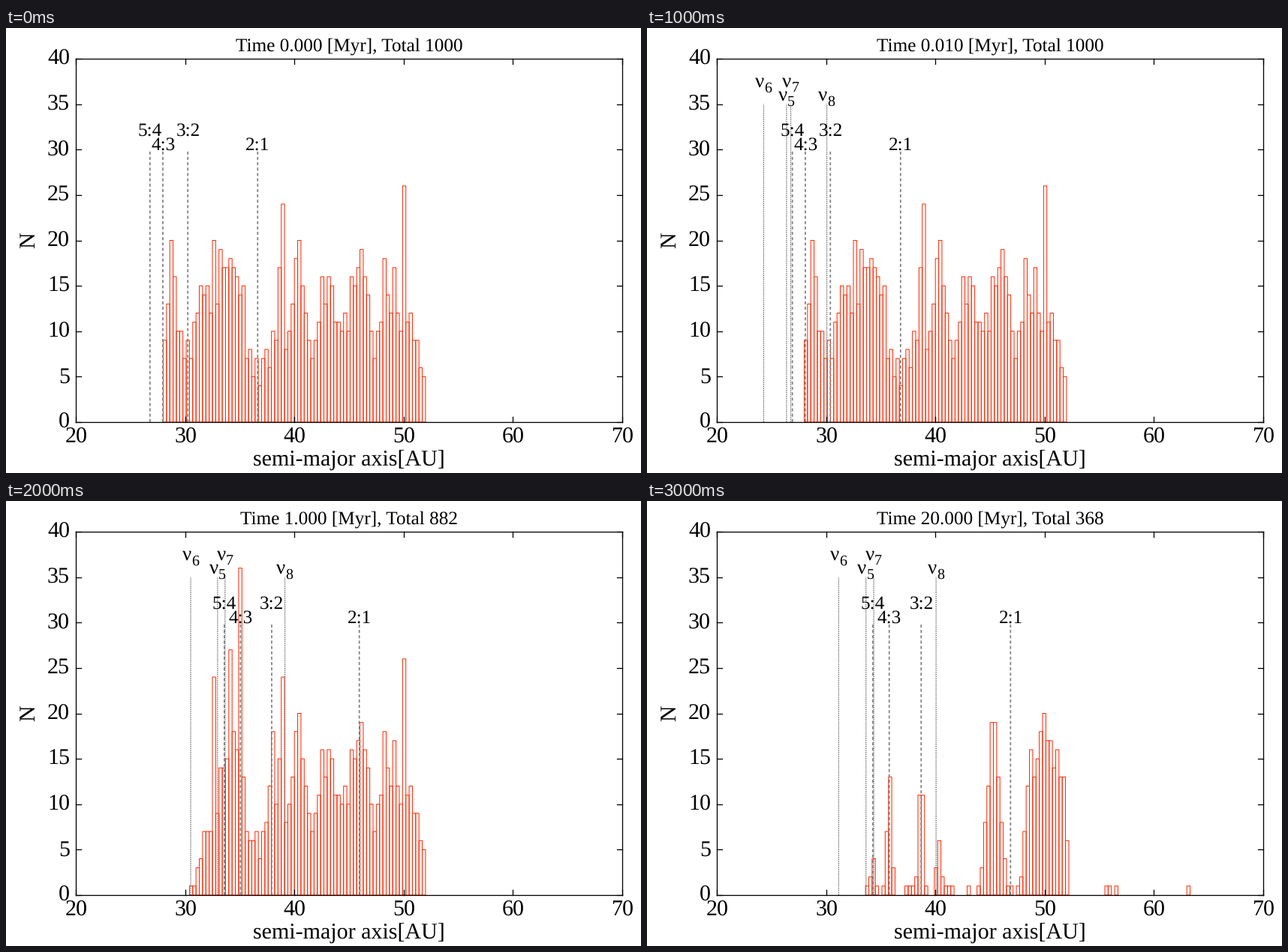
A matplotlib script for the animation above (3500 ms loop, 846 by 594 pixels).

```python
import matplotlib.pyplot as plt
import numpy as np
from matplotlib.animation import FuncAnimation
from matplotlib.collections import LineCollection, PolyCollection

W, H, DPI = 846, 594, 72          # at 72 dpi one point is one pixel
LEFT, RIGHT, TOP, BOTTOM = 93, 821, 41, 526
BIN, BINS, DISC = 0.3, 130, 80    # bin width in AU, all bins, bins in the disc
INNER = 36                        # bins swept during the first Myr

# p, q and label height of the mean-motion resonances
RATIOS = [(5, 4, 32), (4, 3, 30.5), (3, 2, 32), (2, 1, 30.5)]
# index, label height, starting place and drift of the secular resonances
SECULAR = [(6, 37, 24.16, 1.083), (5, 35.5, 26.25, 1.146),
           (7, 37, 26.63, 1.198), (8, 35.5, 29.89, 1.577)]

plt.rcParams["font.family"] = "Liberation Serif"
plt.rcParams["text.hinting"] = "none"
rng = np.random.default_rng(4)


def resonances(planet):
    return [planet * (p / q) ** (2 / 3) for p, q, _ in RATIOS]


def secular(planet):
    return [a + drift * (planet - 23.08) for _, _, a, drift in SECULAR]


def centres(origin):
    return origin + BIN * (np.arange(BINS) + 0.5)


def bump(au, centre, height, width, power=2):
    return height * np.exp(-np.abs((au - centre) / width) ** power)


def settle(shape, total):
    """Whole-numbered, slightly noisy counts that add up to total."""
    shape = shape + rng.normal(0, 0.45, len(shape)) * np.sqrt(shape)
    shape = np.maximum(shape, 0)
    shape /= shape.sum()
    counts = np.rint(shape * total).astype(int)
    while counts.sum() != total:
        i = rng.choice(len(counts), p=shape)
        counts[i] = max(0, counts[i] + np.sign(total - counts.sum()))
    return counts


def disc(total):
    peaks = [(0, 10), (2, 17), (6, 8), (14, 15), (20, 20), (27, 6), (34, 9),
             (36, 22), (37, 9), (41, 19), (45, 8), (50, 16), (54, 10),
             (60, 18), (64, 7), (67, 16), (72, 12), (73, 22), (74, 12),
             (79, 7)]
    counts = np.zeros(BINS, int)
    counts[:DISC] = settle(np.interp(np.arange(DISC), *zip(*peaks)), total)
    return counts


def swept(counts, planet, total):
    """Clear the inner disc and pile bodies up in the resonances."""
    au = centres(28)
    _, four_three, three_two, _ = resonances(planet)
    shape = counts * np.clip((au - 30) / 4.2, 0, 1)
    shape += bump(au, 32.65, 10, 0.12) + bump(au, 34.15, 9, 0.12)
    shape += bump(au, four_three, 22, 0.12) + bump(au, three_two, 9, 0.3)
    result = counts.copy()
    result[:INNER] = settle(shape[:INNER], total - counts[INNER:].sum())
    return result


def belt(origin, planet, total, heights, spread, haze, strays):
    """Resonant groups, two broad belts and a few far bodies."""
    au = centres(origin)
    shape = haze * ((au > 37) & (au < 48))
    for centre, height in zip(resonances(planet), heights):
        shape = shape + bump(au, centre, height, 0.3)
    shape += bump(au, secular(planet)[3] + 0.2, 5, 0.3)
    shape += bump(au, 45.35, 18, spread)
    shape += bump(au, 50.05, 15, 2, 8) + bump(au, 50.05, 8, 0.15)
    counts = settle(shape, total - len(strays))
    for a in strays:
        counts[int((a - origin) / BIN)] += 1
    return counts


start = disc(1000)
stirred = start.copy()
stirred[[0, 5]] += 1
stirred[[1, 7]] -= 1

# time, bin origin, planet axis, counts
STEPS = [
    (0, 28, 23.07, start),
    (0.001, 28, 23.08, start),
    (0.01, 28, 23.18, start),
    (0.1, 28, 24.15, stirred),
    (1, 28, 28.93, swept(start, 28.93, 882)),
    (10, 28, 29.80,
     belt(28, 29.80, 454, (7, 16, 18), 1, 2.5, [65])),
    (20, 27.908, 29.52,
     belt(27.908, 29.52, 368, (5, 13, 12), 0.75, 0.4,
          [55.6, 55.9, 56.5, 63.1])),
]


def px(au):
    return LEFT + (au - 20) * (RIGHT - LEFT) / 50


def py(n):
    return BOTTOM - n * (BOTTOM - TOP) / 40


def stem(au, top):
    return [(px(au) + 0.25, BOTTOM), (px(au) + 0.25, py(top))]


def box(origin, b, n):
    x0, x1 = px(origin + b * BIN), px(origin + (b + 1) * BIN)
    return [(x0, BOTTOM), (x0, py(n)), (x1, py(n)), (x1, BOTTOM)]


fig = plt.figure(figsize=(W / DPI, H / DPI), dpi=DPI, facecolor="white")
ax = fig.add_axes([0, 0, 1, 1])
ax.set_xlim(0, W)
ax.set_ylim(H, 0)
ax.axis("off")


def label(x, y, text="", size=25.2, **kw):
    kw = {"ha": "center", "va": "baseline", **kw}
    return ax.text(x, y, text, fontsize=size, color="black", zorder=5, **kw)


def draw_frame():
    lines = [[(LEFT, TOP), (RIGHT, TOP)], [(LEFT, BOTTOM), (RIGHT, BOTTOM)],
             [(LEFT, TOP), (LEFT, BOTTOM)], [(RIGHT, TOP), (RIGHT, BOTTOM)]]
    for au in range(20, 71, 10):
        x = px(au)
        lines += [[(x, BOTTOM), (x, BOTTOM - 7)], [(x, TOP), (x, TOP + 7)]]
        label(x + 0.5, 554, str(au), 30)
    for n in range(0, 41, 5):
        y = py(n)
        lines += [[(LEFT, y), (LEFT + 7, y)], [(RIGHT, y), (RIGHT - 7, y)]]
        label(85, y + 8, str(n), 30, ha="right")
    ax.add_collection(LineCollection(lines, colors="black", linewidths=1.3,
                                     capstyle="projecting", zorder=4))
    label(457.3, 585, "semi-major axis[AU]", 30)
    label(38, 283.5, "N", 30, rotation=90, rotation_mode="anchor")


draw_frame()
title = label(457.3, 30.5)
bars = PolyCollection([], facecolors="none", edgecolors="#ff2600",
                      linewidths=1, zorder=2)
dashes = LineCollection([], colors="#808080", linewidths=1.7,
                        linestyles=[(0, (2.4, 1.8))], zorder=3)
dots = LineCollection([], colors="#606060", linewidths=1.3,
                      linestyles=[(0, (1, 1))], zorder=3)
for part in (bars, dashes, dots):
    part.set_snap(False)
    ax.add_collection(part, autolim=False)

ratio_labels = [label(0, py(h) + 6, f"{p}:{q}") for p, q, h in RATIOS]
nu_labels = [(label(0, py(h) + 1.5, "\u03bd", 27),
              label(0, py(h) + 8, str(i), 20)) for i, h, _, _ in SECULAR]


def update(frame):
    time, origin, planet, counts = STEPS[frame]
    title.set_text(f"Time {time:.3f} [Myr], Total {counts.sum()}")
    bars.set_verts([box(origin, b, n) for b, n in enumerate(counts) if n])

    axes = resonances(planet)
    dashes.set_segments([stem(a, 30) for a in axes])
    for text, a in zip(ratio_labels, axes):
        text.set_x(px(a) + 0.5)

    # the secular resonances are known only after the first step
    known = time > 0
    axes = secular(planet)
    dots.set_segments([stem(a, 35) for a in axes] if known else [])
    for (nu, index), a in zip(nu_labels, axes):
        nu.set(x=px(a) - 5, visible=known)
        index.set(x=px(a) + 6, visible=known)
    return [title, bars, dashes, dots]


anim = FuncAnimation(fig, update, frames=len(STEPS), interval=500,
                     repeat=True, blit=False)
plt.show()
```
